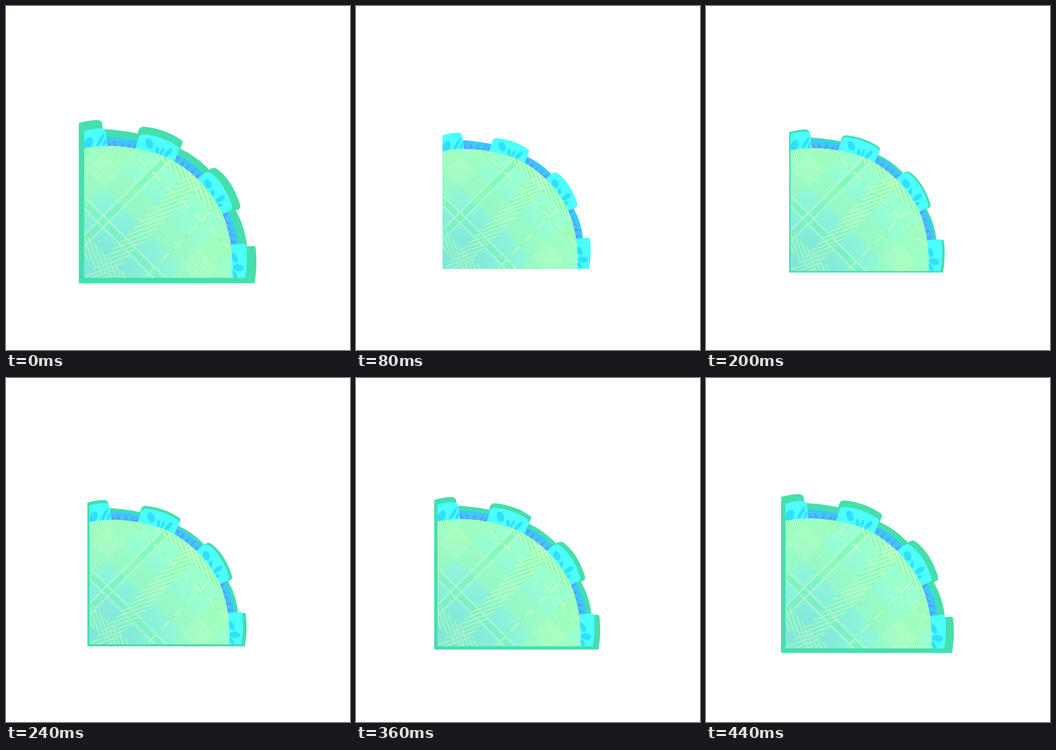
Write an HTML page that moves like this. It is 748 by 748 pixels and loops after 0.48 s.

```html
<!DOCTYPE html>
<html lang="en">
<head>
<meta charset="utf-8">
<title>Plaid quarter pulse</title>
<style>
  @property --k { syntax: "<number>"; inherits: true; initial-value: 0; }
  html, body { margin: 0; width: 100%; height: 100%; overflow: hidden; background: #fff; }
  svg { display: block; width: 100%; height: 100%; animation: pulse 480ms steps(2) infinite; }
  .shadow { transform-origin: 338.5px 414.5px; transform: scale(calc(1 + var(--k))); }
  .art { transform-origin: 374px 374px; transform: scale(calc(1 + var(--k) / 2)); }
  .petals { fill: #2fe0ff; }
  .streaks { fill: #5a9fff; }
  .lines { stroke: #b6ffd0; stroke-width: 3.4; }

  /* quick collapse, then a stepped swell */
  @keyframes pulse {
    0% { --k: .2; }
    16.666% { --k: 0; }
    33.333% { --k: .027; }
    50% { --k: .076; }
    66.666% { --k: .106; }
    83.333% { --k: .137; animation-timing-function: steps(1); }
    91.666% { --k: .168; animation-timing-function: steps(1); }
    100% { --k: .2; }
  }
</style>
</head>
<body>
<svg viewBox="0 0 748 748">
  <defs>
    <path id="band" d="M170 284H218Q252 286 283 292L330 306L374 324Q403 338 427 362L462 412L484 449Q501 480 505 516L508 540H490L410 400L300 330L170 320Z"/>
    <path id="tabs" d="M170 272Q190 266 207 266Q215 266 216.500 273L221 306L170 316Z
      M280 314L289 286Q292 279 299 279Q341 283 373 305Q378 308 376 313L364 342Z
      M414 378L431 364Q438 359 445 363Q475 385 491 434Q493 441 488 444L468 454Z
      M489 519L515 517Q521 516 522 520Q526 555 520 591H486Z"/>
    <path id="cloth" d="M170 310C205 302 245 303 281 310S343 324 366 338S402 362 418 378S455 418 470 452S494 530 492 591H170Z"/>
    <g id="whole">
      <use href="#band"/><use href="#tabs"/><use href="#cloth"/>
    </g>
    <clipPath id="clothClip"><use href="#cloth"/></clipPath>
    <clipPath id="edge"><path d="M170 200H600V591H170Z"/></clipPath>

    <radialGradient id="sheen" gradientUnits="userSpaceOnUse" cx="205" cy="570" r="300">
      <stop offset="0" stop-color="#86ebda"/>
      <stop offset=".4" stop-color="#90f8d8"/>
      <stop offset=".75" stop-color="#99ffd2"/>
      <stop offset="1" stop-color="#9dffce"/>
    </radialGradient>
    <radialGradient id="shade" gradientUnits="userSpaceOnUse" cx="190" cy="580" r="260">
      <stop offset="0" stop-color="#74dbe0" stop-opacity=".4"/>
      <stop offset="1" stop-color="#74dbe0" stop-opacity="0"/>
    </radialGradient>

    <pattern id="fineA" width="10" height="4.600" patternUnits="userSpaceOnUse" patternTransform="rotate(25)">
      <path d="M0 1H10V2.900H0Z" fill="#c9ffc4"/>
    </pattern>
    <pattern id="fineB" width="4.600" height="10" patternUnits="userSpaceOnUse" patternTransform="rotate(25)">
      <path d="M1 0H2.900V10H1Z" fill="#c9ffc4"/>
    </pattern>
    <pattern id="thickA" width="10" height="8.800" patternUnits="userSpaceOnUse" patternTransform="rotate(25)">
      <path d="M0 2H10V5.400H0Z" fill="#c9ffc4"/>
    </pattern>
    <pattern id="thickB" width="8.800" height="10" patternUnits="userSpaceOnUse" patternTransform="rotate(25)">
      <path d="M2 0H5.400V10H2Z" fill="#c9ffc4"/>
    </pattern>
  </defs>

  <g class="shadow">
    <use href="#whole" transform="matrix(.91 0 0 .91 33.660 33.660)" fill="#45dfae"/>
  </g>

  <g class="art">
    <g transform="matrix(.91 0 0 .91 33.660 33.660)" clip-path="url(#edge)">
      <use href="#band" fill="#3bc9ff"/>
      <g class="streaks">
        <path d="M221 291L232 306H221ZM233 291Q241 295 242 306H234ZM249 306L254 292L258 306ZM262 307L276 293L270 308ZM274 309L282 297L281 311Z"/>
        <path d="M370 326L379 330L372 342ZM378 344L389 333L385 349ZM389 352L402 344L395 357ZM400 361L415 351L406 366ZM408 370L424 364L416 377Z"/>
        <path d="M470 452L483 449L474 462ZM475 464L490 475L478 473ZM479 477L495 491L482 486ZM484 492L501 499L486 502ZM488 508L502 512L490 519Z"/>
      </g>
      <use href="#tabs" fill="#4dfffc"/>
      <g class="petals">
        <ellipse cx="179" cy="299" rx="9" ry="15" transform="rotate(25 179 299)"/>
        <ellipse cx="205" cy="293" rx="4" ry="17" transform="rotate(30 205 293)"/>
        <ellipse cx="214" cy="299" rx="3" ry="10" transform="rotate(18 214 299)"/>
        <ellipse cx="312" cy="299" rx="8" ry="12" transform="rotate(-22 312 299)"/>
        <ellipse cx="329" cy="314" rx="4" ry="9"/>
        <ellipse cx="339" cy="316" rx="3" ry="10" transform="rotate(25 339 316)"/>
        <ellipse cx="352" cy="320" rx="5" ry="13" transform="rotate(45 352 320)"/>
        <ellipse cx="439" cy="387" rx="8" ry="11" transform="rotate(-25 439 387)"/>
        <ellipse cx="449" cy="407" rx="4" ry="9" transform="rotate(10 449 407)"/>
        <ellipse cx="466" cy="419" rx="6" ry="12" transform="rotate(55 466 419)"/>
        <ellipse cx="463" cy="434" rx="4" ry="8" transform="rotate(75 463 434)"/>
        <ellipse cx="497" cy="548" rx="6" ry="11" transform="rotate(-25 497 548)"/>
        <ellipse cx="505" cy="569" rx="12" ry="7.500" transform="rotate(8 505 569)"/>
        <ellipse cx="497" cy="583" rx="4" ry="9" transform="rotate(-28 497 583)"/>
      </g>

      <use href="#cloth" fill="url(#sheen)"/>
      <g clip-path="url(#clothClip)">
        <!-- axes turned 45 degrees: x crosses the rising bands, y the falling ones -->
        <g transform="rotate(45)">
          <g fill="#82ffaa" opacity=".45">
            <path d="M375-160H431V330H375ZM537-160H575V330H537ZM668-160H728V330H668Z"/>
            <path d="M300-38H800V-2H300ZM300 76H800V130H300ZM300 229H800V265H300Z"/>
          </g>
          <g fill="#7cfab0" opacity=".75">
            <path d="M475-160H487V330H475ZM300 176H800V188H300Z"/>
          </g>
          <g opacity=".7">
            <path d="M375-160H431V330H375ZM668-160H728V330H668Z" fill="url(#fineB)"/>
            <path d="M300 76H800V130H300Z" fill="url(#fineA)"/>
          </g>
          <g opacity=".85">
            <path d="M537-160H575V330H537Z" fill="url(#thickB)"/>
            <path d="M300-38H800V-2H300ZM300 229H800V265H300Z" fill="url(#thickA)"/>
          </g>
          <g class="lines" fill="none">
            <path d="M472-160V330M490-160V330M300 173H800M300 191H800"/>
            <path d="M631-160V330M300 30H800" stroke="#8effb4" stroke-width="5" opacity=".6"/>
            <path d="M631-42V330M437 30H800" stroke="#c6ffc4" stroke-dasharray="26 17"/>
          </g>
        </g>
        <use href="#cloth" fill="url(#shade)"/>
      </g>
    </g>
  </g>
</svg>
</body>
</html>
```
